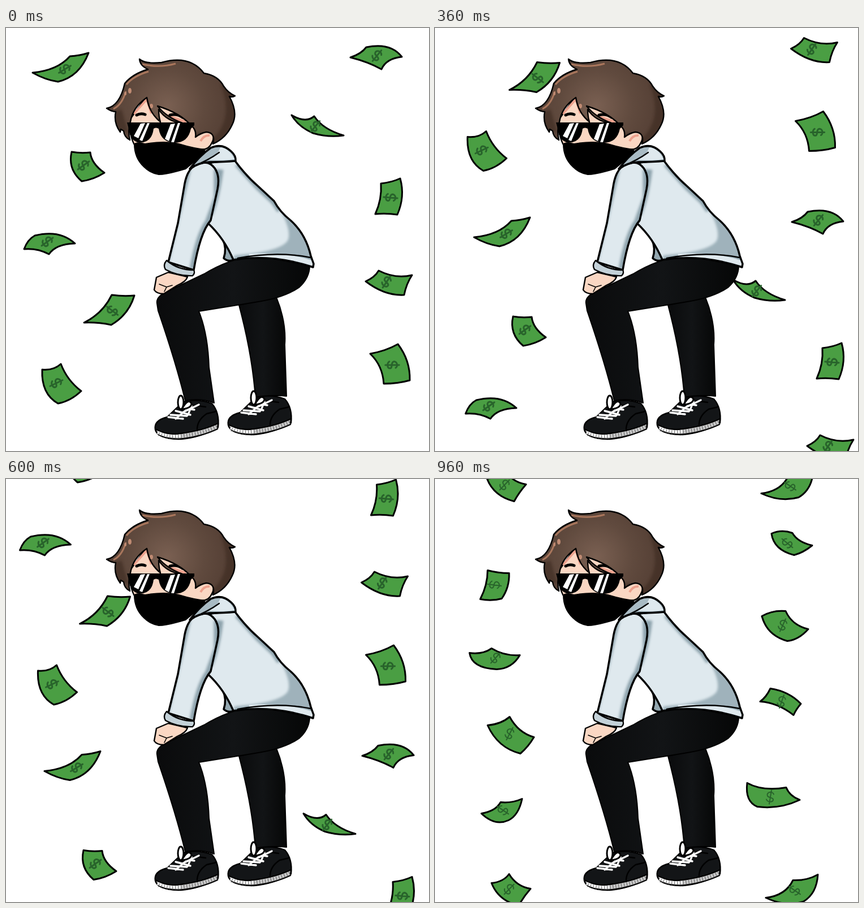
Recreate the animation shown at these times as an HTML page. Size 748 by 748 pixels, loop 1.08 s.

```html
<!DOCTYPE html>
<html lang="en">
<head>
<meta charset="utf-8">
<title>Money dance</title>
<style>
html, body { margin: 0; width: 100%; height: 100%; overflow: hidden; background: #fff; }
svg { display: block; width: 100vw; height: 100vh; }
.ink { stroke: #000; stroke-width: 3.5; stroke-linejoin: round; stroke-linecap: round; }
.line { fill: none; }
.thin { stroke-width: 2.4; }
.fine { stroke-width: 1.6; }
.bold { stroke-width: 5; }
.cloth { fill: #dfe9ee; }
.shade { fill: none; stroke: #8fa4ae; stroke-width: 13; filter: url(#soft); }
.shade.slim { stroke-width: 6; }
.fold { fill: #9fb2bb; filter: url(#soft); }
.skin { fill: #fad7c3; }
.pants { fill: url(#denim); stroke-width: 2; }
.bill { fill: #4a9e43; stroke: #000; stroke-width: 3; stroke-linejoin: round; }
.mark { fill: none; stroke: #28632b; stroke-linecap: round; }
</style>
</head>
<body>
<svg viewBox="0 0 748 748" xmlns="http://www.w3.org/2000/svg">
<defs>
  <radialGradient id="brown" gradientUnits="userSpaceOnUse" cx="285" cy="138" r="130">
    <stop offset="0" stop-color="#7a6052"/><stop offset=".5" stop-color="#604a3e"/><stop offset="1" stop-color="#503b31"/>
  </radialGradient>
  <linearGradient id="denim" x1="0" y1="0" x2="1" y2="0">
    <stop offset="0" stop-color="#0a0b0c"/><stop offset=".5" stop-color="#121416"/><stop offset="1" stop-color="#060707"/>
  </linearGradient>
  <filter id="soft" x="-30%" y="-30%" width="160%" height="160%"><feGaussianBlur stdDeviation="2"/></filter>
  <path id="dollar" d="M6-5C3-12-8-8-5-2C-3 2 6 0 5 5C4 10-5 9-7 4M2-12L-2 12"/>
  <path id="torsoA" d="M330 246Q365 234 405 235Q425 262 446 280L474 306Q484 325 503 340Q530 364 539 403L544 417L543 423Q470 399 402 410Q386 372 357 345Z"/>
  <path id="torsoB" d="M330 246Q365 234 405 235Q425 262 446 280L474 306Q486 321 510 336Q548 361 550 387L557 403L556 414Q500 396 424 401Q388 383 357 345Z"/>
  <path id="sleeve" d="M329 247Q350 233 362 241Q380 254 374 285L362 340Q343 362 332 428L287 414L304 345L316 275Q320 255 329 247Z"/>
  <path id="hair" d="M236 55Q246 64 275 61Q325 47 350 80Q375 84 385 103Q393 115 405 120Q401 123 395 121Q411 150 400 171Q389 195 366 205Q371 185 354 184Q344 186 335 193Q337 180 328 173Q308 150 268 138Q284 158 312 168Q285 166 270 144Q270 157 273 166Q253 150 249 123Q224 140 220 166Q215 180 219 198Q209 193 208 182L203 179L202 184Q190 168 194 148Q187 148 178 142Q201 138 210 98Q224 81 251 73Q237 67 236 55Z"/>
  <clipPath id="clipA"><use href="#torsoA"/></clipPath>
  <clipPath id="clipB"><use href="#torsoB"/></clipPath>
  <clipPath id="clipArm"><use href="#sleeve"/></clipPath>
  <clipPath id="clipHair"><use href="#hair"/></clipPath>
  <g id="shoe">
    <path class="ink thin" fill="#131517" d="M264 710Q261 694 285 688L313 661Q340 655 364 664Q378 680 375 706Q345 724 309 727Q267 726 264 710Z"/>
    <path class="ink thin" fill="#c9c9c9" d="M264 709Q285 721 309 717Q348 712 375 699L374 709Q345 723 305 727Q267 726 264 709Z"/>
    <path class="line" stroke="#fff" stroke-width="5" d="M268 715Q285 724 309 721"/>
    <path class="line" stroke="#555" stroke-width="7" stroke-dasharray="1 4" d="M270 718Q285 725 309 722Q348 718 373 705"/>
    <path class="ink line thin" d="M338 712Q337 694 355 682L372 678M316 665L353 670"/>
    <path class="line" stroke="#fff" stroke-width="3.4" stroke-linecap="round" d="M287 688L313 691M291 684L320 686M300 677L326 684M318 676L300 691M309 671L333 675M312 680L341 666M322 684L328 668"/>
    <g fill="#fff" stroke="#000" stroke-width="3">
      <ellipse cx="309" cy="662" rx="5" ry="12"/>
      <path d="M312 672Q323 654 328 664Q328 672 312 674Z"/>
    </g>
  </g>
</defs>

<g id="money"></g>

<path class="ink pants" d="M412 490L478 476Q496 520 493 560L496 651Q468 648 441 655Q436 580 412 490Z"/>
<path class="ink" fill="#93a7b0" d="M383 373Q391 390 385 407Q392 414 404 410L424 401Z"/>

<g id="poseA">
  <path class="ink pants" d="M267 487Q265 475 285 466L350 435Q395 408 440 402L537 420Q537 442 518 459Q490 478 440 485L341 501Q357 540 359 600L368 663Q345 654 317 659Q300 590 269 500Z"/>
  <use href="#torsoA" class="cloth"/>
  <g clip-path="url(#clipA)">
    <path class="shade" d="M378 250Q372 300 359 330M410 240L446 280L474 306L485 322"/>
    <path class="fold" d="M470 300Q506 350 499 374Q490 395 404 402L400 420L560 430L560 340Z"/>
    <path class="line" stroke="#dfe9ee" stroke-width="9" d="M430 404Q500 399 550 419"/>
  </g>
  <use href="#torsoA" class="ink line"/>
  <path class="ink line thin" d="M410 407Q480 394 539 406"/>
</g>
<g id="poseB">
  <path class="ink pants" d="M267 487Q265 475 285 466L350 435Q395 410 430 398L546 404Q547 435 523 457Q490 479 440 485L341 501Q357 540 359 600L368 663Q345 654 317 659Q300 590 269 500Z"/>
  <use href="#torsoB" class="cloth"/>
  <g clip-path="url(#clipB)">
    <path class="shade" d="M378 250Q372 300 359 330M410 240L446 280L474 306L490 324"/>
    <path class="fold" d="M470 300Q515 345 512 364Q500 382 424 393L424 402L500 384L552 388L570 340Z"/>
  </g>
  <use href="#torsoB" class="ink line"/>
  <path class="ink line" d="M424 400Q480 381 550 388"/>
</g>

<use href="#shoe"/>
<use href="#shoe" x="129" y="-8"/>

<path class="ink skin thin" d="M287 432L266 441L262 463Q266 470 279 470L303 455Q318 449 321 440Z"/>
<path class="ink line fine" d="M271 453L284 458L280 466M284 458L294 455"/>
<use href="#sleeve" class="cloth"/>
<g clip-path="url(#clipArm)">
  <path class="shade" d="M374 250L374 300L358 344Q342 365 331 426"/>
  <path class="shade slim" d="M324 250L302 345L286 412"/>
</g>
<use href="#sleeve" class="ink line"/>
<path class="ink thin" fill="#c3d1d8" d="M284 411Q277 419 282 427Q304 439 330 438Q335 433 332 428Q304 428 284 411Z"/>

<path class="ink" fill="#a9bbc4" d="M325 249Q342 226 362 212Q382 203 398 218Q407 226 406 235Q385 237 360 237Q340 238 325 249Z"/>
<path class="cloth" d="M358 233Q374 226 379 211Q395 213 404 232Q385 235 358 233Z"/>
<path class="ink line thin" d="M328 246Q358 234 377 220"/>

<path class="ink skin thin" d="M219 162L250 119L322 145L358 183Q372 188 364 203Q359 215 346 215L228 208Q218 192 219 162Z"/>
<path class="line" stroke="#eda18d" stroke-width="4" d="M226 152L249 126L257 151M276 152Q300 160 318 166M360 190Q350 189 344 200"/>
<path class="ink line bold" d="M231 154Q238 150 246 153M290 154Q302 151 312 158"/>
<use href="#hair" fill="url(#brown)"/>
<g clip-path="url(#clipHair)">
  <path class="line" stroke="#38261f" stroke-width="26" opacity=".5" filter="url(#soft)" d="M392 95Q420 165 372 208L335 196M192 148L203 186"/>
  <path class="line" stroke="#a9765c" stroke-width="3" d="M241 64Q270 71 300 63M213 100Q225 85 252 77M190 143Q205 136 212 112"/>
  <g fill="#c08b73"><ellipse cx="219" cy="111" rx="3" ry="5"/><ellipse cx="211" cy="116" rx="2" ry="3"/><ellipse cx="257" cy="138" rx="3" ry="4"/></g>
</g>
<use href="#hair" class="ink line thin"/>

<path d="M214 167L333 167L333 172L327 178Q322 203 298 203Q274 202 270 178Q265 175 261 178Q258 203 236 203Q219 200 217 178Z"/>
<path fill="#fff" d="M238 169L246 168L234 195L226 191ZM250 168L254 168L241 200L236 198ZM291 170L299 169L288 200L281 196ZM304 168L308 168L297 202L292 202Z"/>
<path d="M226 205Q230 200 246 204Q280 198 306 204Q332 212 353 214Q351 226 337 234L318 250Q285 260 270 260Q255 258 243 246Q226 230 226 205Z"/>
</svg>

<script>
const NS = "http://www.w3.org/2000/svg";
const el = (tag, attrs, parent) => {
  const node = document.createElementNS(NS, tag);
  for (const key in attrs) node.setAttribute(key, attrs[key]);
  return parent.appendChild(node);
};

// Each bill: outline, then "x y angle" of its dollar sign.
const leftOne = [
  ["M47 79Q91 75 113 50Q130 49 146 44Q130 86 92 95Q70 92 47 79", "104 73 50"],
  ["M116 219Q132 222 149 220Q151 240 174 256Q155 268 134 271Q109 250 116 219", "137 243 45"],
  ["M51 367Q95 356 122 381Q88 382 76 400Q56 389 32 391Q38 374 51 367", "73 378 45"],
  ["M138 521Q171 505 187 472Q208 475 227 473Q217 507 186 525Q162 520 138 521", "188 500 -62"],
  ["M64 604Q84 606 97 594Q108 623 133 642Q114 660 92 664Q62 647 64 604", "89 628 55"]
];
const rightOne = [
  ["M609 52Q628 46 637 34Q680 25 700 51Q672 54 664 73Q641 60 609 52", "656 49 30"],
  ["M505 154Q530 169 545 156Q560 179 597 190Q570 194 543 186Q517 175 505 154", "547 174 30"],
  ["M663 275Q682 273 697 266Q706 298 692 330Q672 327 653 329Q665 303 663 275", "680 300 85"],
  ["M636 448Q652 441 659 429Q688 444 718 437Q708 452 704 472Q670 474 636 448", "673 449 25"],
  ["M644 576Q672 571 693 559Q715 588 714 623Q693 629 668 629Q666 597 644 576", "683 596 80"]
];
const leftTwo = [
  ["M94 11Q118 9 133-4Q148 24 176 32Q166 49 152 61Q112 51 94 11", "133 26 18"],
  ["M83 167Q108 163 117 147Q137 149 155 141Q149 170 131 179Q107 190 83 167", "121 161 -65"],
  ["M101 290Q122 288 132 274Q145 296 170 300Q157 315 149 330Q113 321 101 290", "132 301 35"],
  ["M102 452Q121 457 140 457Q141 482 127 502Q109 507 89 503Q102 478 102 452", "114 478 88"],
  ["M70 598Q94 601 109 590Q132 604 159 602Q145 626 118 627Q74 625 70 598", "116 607 33"]
];
const rightTwo = [
  ["M553 113Q580 128 622 121Q628 136 646 143Q610 160 571 155Q549 146 553 113", "594 138 0"],
  ["M586 316Q621 312 634 285Q659 286 678 275Q676 309 652 323Q620 332 586 316", "637 303 -65"],
  ["M604 387Q622 379 641 386Q650 402 676 408Q660 421 644 425Q608 416 604 387", "632 404 -60"],
  ["M587 533Q606 522 629 524Q640 549 669 556Q652 575 632 577Q596 567 587 533", "624 549 15"],
  ["M584 684Q595 676 602 661Q635 666 656 688Q648 697 643 708Q615 686 584 684", "622 684 10"]
];

const money = document.getElementById("money");
const makeSheet = (bills, size, pen) => [0, 1].map(() => {
  const g = el("g", {}, money);
  for (const [d, mark] of bills) {
    const [x, y, turn] = mark.split(" ");
    el("path", { class: "bill", d: d + "Z" }, g);
    el("use", {
      href: "#dollar", class: "mark", "stroke-width": pen,
      transform: `translate(${x} ${y}) rotate(${turn}) scale(${size})`
    }, g);
  }
  return g;
});
const sheets = [
  { copies: makeSheet([...leftOne, ...rightOne], 1, 3), period: [28.5, 702.5] },
  { copies: makeSheet([...leftTwo, ...rightTwo], 1, 2), period: [8, 715] }
];

// sheet, x, y, pose, copy: -1 repeats above, 1 repeats below, 0 none
const steps = [
  [0, 0, 0, "A", 0],
  [0, 22, 146, "B", -1],
  [1, 0, 0, "B", 1],
  [0, 22, 291, "A", -1],
  [1, -6.5, 138.5, "A", -1],
  [0, 21, 437.5, "A", -1],
  [1, -3, 282, "B", -1],
  [0, 19.5, 571, "B", -1],
  [1, -1, 424.5, "A", -1]
];
const STEP = 120;
const poses = { A: document.getElementById("poseA"), B: document.getElementById("poseB") };
const show = (node, on) => node.setAttribute("display", on ? "inline" : "none");

function draw(now) {
  const [sheet, x, y, pose, copy] = steps[Math.floor(now / STEP) % steps.length];
  sheets.forEach(({ copies, period }, i) => {
    copies.forEach((g, n) => {
      const k = n * copy;
      show(g, i === sheet && (n === 0 || copy !== 0));
      g.setAttribute("transform", `translate(${x + k * period[0]} ${y + k * period[1]})`);
    });
  });
  for (const name in poses) show(poses[name], name === pose);
}

const start = performance.now();
function tick(now) {
  draw(Math.max(0, now - start));
  requestAnimationFrame(tick);
}
draw(0);
requestAnimationFrame(tick);
</script>
</body>
</html>
```
